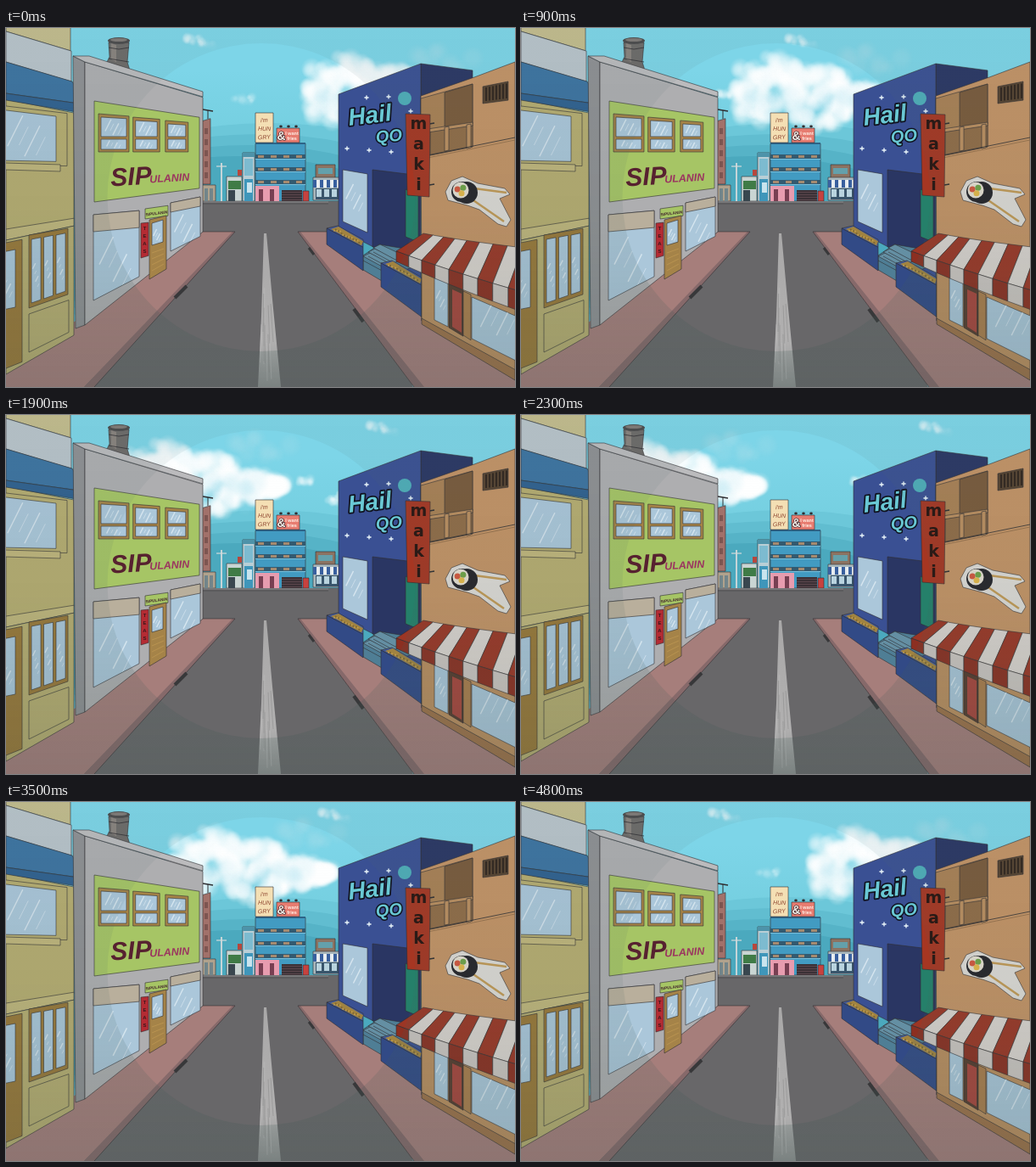
Animation of 600x423 px, one loop 4900 ms. Source, as an HTML page with a canvas:

```html
<!DOCTYPE html>
<html lang="en">
<head>
<meta charset="utf-8">
<title>Street with drifting clouds</title>
<style>
html,body{margin:0;width:100%;height:100%;overflow:hidden;background:#78c9dd}
canvas{display:block;width:100%;height:100%}
</style>
</head>
<body>
<canvas id="stage" width="600" height="423"></canvas>
<script>
const W = 600, H = 423, STEP = 100, FRAMES = 49, SPEED = 11.33, PAD = 40;
const INK = '#2f2e31';
const SANS = '"Liberation Sans", Arial, sans-serif', WIDE = '"DejaVu Sans", sans-serif';
const view = document.getElementById('stage').getContext('2d');
let c;

function layer(w, h, draw) {
  const el = document.createElement('canvas');
  el.width = w; el.height = h;
  c = el.getContext('2d');
  c.lineJoin = 'round';
  draw();
  return el;
}

function times(n, fn) { for (let i = 0; i < n; i++) fn(i); }

function random(seed) {
  return () => (seed = (seed * 16807) % 2147483647) / 2147483647;
}

function trace(p) {
  c.beginPath();
  for (let i = 0; i < p.length; i += 2) c.lineTo(p[i], p[i + 1]);
}

function poly(fill, ...p) {
  trace(p); c.closePath();
  c.fillStyle = fill; c.fill();
}

function shape(fill, ...p) {
  poly(fill, ...p);
  c.strokeStyle = INK; c.lineWidth = 0.6; c.stroke();
}

function line(color, width, ...p) {
  trace(p);
  c.strokeStyle = color; c.lineWidth = width; c.stroke();
}

function rect(fill, x, y, w, h) { c.fillStyle = fill; c.fillRect(x, y, w, h); }

function oval(fill, x, y, rx, ry = rx) {
  c.beginPath(); c.ellipse(x, y, rx, ry, 0, 0, 7);
  c.fillStyle = fill; c.fill();
}

// Upright-sided panel whose top and bottom edges have slopes s and t.
function slab(x, y, w, h, s = 0, t = s) {
  return [x, y, x + w, y + s * w, x + w, y + h + t * w, x, y + h];
}

function box(fill, ...dims) { shape(fill, ...slab(...dims)); }

function pane(x, y, w, h, s = 0, t = s) {
  const p = slab(x, y, w, h, s, t), k = Math.min(w, h) * 0.3;
  shape('#abc7da', ...p);
  c.save();
  trace(p); c.closePath(); c.clip();
  times(4, i => {
    const gx = x + w * (0.28 + i * 0.15), gy = y + h * (0.42 + i * 0.1), r = k * (i % 2 ? 0.6 : 1);
    line('rgba(232,242,248,.7)', i % 2 ? 0.7 : 1.4, gx - r / 2, gy + r, gx + r / 2, gy - r);
  });
  c.restore();
}

function text(str, x, y, font, fill, rot = 0, outline = 0) {
  c.save();
  c.translate(x, y); c.rotate(rot);
  c.font = font; c.textAlign = 'center';
  if (outline) { c.strokeStyle = '#10131f'; c.lineWidth = outline; c.strokeText(str, 0, 0); }
  c.fillStyle = fill; c.fillText(str, 0, 0);
  c.restore();
}

function sparkle(x, y) {
  times(2, i => oval('#dce8f2', x, y, i ? 3 : 0.9, i ? 0.9 : 3));
}

function puff(x, y, r, alpha, tint = '255,255,255') {
  const g = c.createRadialGradient(x, y, 0, x, y, r);
  g.addColorStop(0, `rgba(${tint},${alpha})`);
  g.addColorStop(0.5, `rgba(${tint},${alpha * 0.7})`);
  g.addColorStop(1, `rgba(${tint},0)`);
  c.fillStyle = g;
  c.fillRect(x - r, y - r, r * 2, r * 2);
}

function drawSky() {
  rect('#7dd5e8', 0, 0, W, H);
  const g = c.createLinearGradient(0, 50, 0, 125);
  g.addColorStop(0, 'rgba(117,207,224,0)');
  g.addColorStop(1, '#75cfe0');
  rect(g, 0, 50, W, H);
  times(4, i => oval(`rgb(${108 - i * 11},${199 - i * 10},${217 - i * 9})`, 310 - i * 12, 260, 280 - i * 15, 148 - i * 13));
}

function drawBigCloud() {
  c.translate(PAD, 0);
  const rnd = random(71);
  times(9, () => puff(140 + rnd() * 65, 22 + rnd() * 30, 9 + rnd() * 7, 0.16, '200,228,234'));
  times(330, () => {
    const u = rnd(), r = 8 + rnd() * 7;
    const top = 26 + 52 * u ** 2 + 14 * (1 - u) ** 8 + 4 * Math.sin(u * 19);
    const low = 109 + 13 * Math.sin(Math.PI * u) - 24 * u ** 6 + 4 * Math.sin(u * 15);
    puff(10 + 188 * u, top + r * 0.6 + rnd() * (low - top - r * 1.2), r, 0.42);
  });
  times(26, () => puff(25 + rnd() * 150, 68 + rnd() * 45, 8 + rnd() * 10, 0.17, '150,216,234'));
}

function drawSmallClouds() {
  c.translate(PAD, 0);
  const rnd = random(19);
  const wisp = (x, y, rx, ry, alpha) => times(14, () =>
    puff(x + (rnd() * 2 - 1) * rx, y + (rnd() * 2 - 1) * ry, 3 + rnd() * 4, alpha));
  wisp(222, 14, 10, 4, 0.22);
  wisp(238, 19, 9, 2, 0.05);
  wisp(280, 83, 13, 3, 0.13);
  wisp(138, 78, 9, 3, 0.24);
  wisp(172, 97, 8, 6, 0.3);
}

function drawRoad() {
  poly('#686769', 228, 204, 395, 204, 395, 240, 480, 423, 90, 423, 228, 240);
  times(2, i => line(i ? '#4d4d50' : '#8b8b8d', 0.9, 231, 205 + i * 2, 380, 205 + i * 2));
  const walk = '#a67e7b', curb = '#86696a';
  poly(walk, 228, 240, 270, 240, 92, 423, 0, 423, 0, 400, 82, 345);
  poly(walk, 344, 240, 380, 240, 600, 400, 600, 423, 481, 423);
  poly(curb, 267, 240, 270, 240, 104, 423, 92, 423);
  poly(curb, 344, 240, 347, 240, 493, 423, 481, 423);
  line(INK, 0.6, 231, 240, 270, 240, 104, 423);
  line(INK, 0.6, 378, 240, 344, 240, 481, 423);
  line('#38383a', 4, 199, 318, 213, 304);
  line('#38383a', 4, 410, 331, 421, 346);
  line('#38383a', 3, 357, 259, 363, 267);
  const g = c.createLinearGradient(0, 242, 0, 423);
  g.addColorStop(0, '#a9a8a8');
  g.addColorStop(0.7, '#b1b0b0');
  g.addColorStop(1, '#8d8f8f');
  poly(g, 304, 242, 307, 242, 314, 320, 324, 423, 297, 423, 301, 340);
  const rnd = random(5);
  times(12, () => {
    const u = rnd() * 0.8 + 0.1, y = 300 + rnd() * 75;
    const x = v => 304 + u * 3 + (u * 24 - 8) * (v - 242) / 181;
    line(rnd() < 0.5 ? 'rgba(125,125,126,.4)' : 'rgba(195,195,195,.4)', 1, x(y), y, x(y + 45), y + 45);
  });
}

function drawBackdrop() {
  // brick corner, lamp and pole
  box('#a2716a', 230, 110, 11, 74, -0.3, 0);
  times(5, i => rect('#7d5551', 234, 118 + i * 13, 4, 7));
  line(INK, 1, 238, 107, 238, 97);
  line(INK, 1.3, 232, 96, 244, 98);
  box('#b0a28d', 230, 185, 17, 19);
  times(2, i => rect('#72858a', 234 + i * 6, 189, 4, 15));
  line('#d3dadb', 1.8, 254, 159, 254, 204);
  line('#d3dadb', 1.2, 248, 163, 260, 163);
  // small shops
  box('#c9d5d3', 260, 175, 18, 29);
  rect('#3f7b46', 262, 180, 15, 10);
  rect('#39474f', 262, 191, 8, 13);
  rect('#b6473c', 273, 167, 5, 7);
  box('#b9cfd6', 279, 147, 14, 57);
  rect('#4e93a9', 279, 147, 14, 5);
  rect('#7dbbd0', 281, 154, 10, 20);
  rect('#3f96ba', 281, 178, 10, 26);
  rect('#c9e4ee', 284, 182, 6, 12);
  // blue block
  box('#429bc2', 294, 136, 59, 68);
  rect('#2d6487', 294, 135, 59, 2);
  times(3, i => {
    const y = 149 + i * 15;
    rect('#335a70', 294, y, 59, 5);
    times(4, k => rect('#a58a70', 297 + k * 15, y + 1, 7, 3));
    rect('#79c0dc', 294, y + 5, 59, 1);
  });
  rect('#e79caf', 294, 186, 28, 18);
  times(2, i => rect('#783f52', 298 + i * 13, 190, 5, 14));
  rect('#3b3136', 325, 191, 24, 13);
  times(4, i => rect('#675057', 325, 193 + i * 3, 24, 0.7));
  box('#c7423f', 350, 192, 7, 12);
  // striped shop
  box('#8c7362', 365, 161, 23, 16);
  rect('#64a0ab', 368, 165, 17, 7);
  box('#a9b8bd', 362, 176, 32, 27);
  times(8, i => rect(i % 2 ? '#e8edf0' : '#385f9e', 362 + i * 4, 179, 4, 9));
  rect('#39556b', 365, 189, 27, 13);
  times(3, i => rect('#b8d3de', 366 + i * 9, 190, 6, 9));
  // roof signs
  box('#f4dfb4', 294, 100, 21, 35);
  ["i'm", 'HUN', 'GRY'].forEach((s, i) =>
    text(s, 304.5, 111 + i * 10, 'italic 7px ' + SANS, '#8e4630', i % 2 ? 0.04 : -0.08));
  box('#e77c70', 319, 118, 27, 17);
  times(3, i => oval(INK, 324 + i * 9, 116, 1.8, 1.4));
  text('&', 324.5, 132, 'bold 14px ' + SANS, '#fff1e8', 0, 1.2);
  ['I want', 'fries'].forEach((s, i) => text(s, 337, 126 + i * 6, 'bold 5.5px ' + SANS, '#fff1e8'));
}

function drawYellowHouse() {
  const wall = '#b7ad70', trim = '#c0b67b', wood = '#9a7838';
  box('#c3bc8c', 0, -40, 76, 44, 0, 0.3);
  box('#b9c4ca', 0, 4, 77, 36, 0.3);
  box(wall, 0, 84, 80, 156, 0.2, -0.18);
  box(wall, -8, 91, 80, 70, 0.12, 0.02);
  pane(-8, 96, 67, 60, 0.12, 0.02);
  box(trim, -2, 159, 66, 8, 0.03);
  shape('#3c73a1', 0, 40, 78, 63, 93, 90, 0, 77);
  box('#2f608f', 0, 77, 93, 8, 0.14, 0.17);
  box(trim, 0, 237, 80, 13, -0.16, -0.21);
  box(wall, 0, 250, 80, 158, -0.21, -0.575);
  box(wood, -10, 255, 29, 150, -0.2, -0.4);
  pane(-9, 265, 20, 68, -0.2);
  box(wood, 27, 244, 46, 86, -0.17, -0.35);
  times(3, i => pane(30 + i * 14.5, 249 - i * 2.5, 11, 75 - i * 2.5, -0.2, -0.35));
  box(wall, 27, 337, 47, 45, -0.35, -0.5);
}

function drawTeaHouse() {
  const wall = '#aeaeb0', wood = '#a58348', tint = '#b9af9c';
  shape('#6d6a68', 121, 17, 145, 17, 143, 40, 146, 50, 119, 40, 122, 34);
  poly('#89827d', 124, 18, 130, 20, 130, 40, 124, 37);
  times(2, i => oval(i ? '#7f7a76' : '#4b4a4b', 133, 15 - i, 13 - i * 3, 4 - i * 2));
  times(2, i => line(INK, 0.8, 121, 23 + i * 13, 133, 25 + i * 13, 145, 23 + i * 17));
  shape('#8f9093', 79, 33, 93, 40, 93, 350, 82, 354);
  box(wall, 93, 40, 139, 310, 0.3, -0.79);
  shape('#bbbbbd', 79, 33, 98, 33, 232, 75, 232, 81, 93, 40);
  box('#a6c565', 104, 86, 124, 119, 0.155, -0.13);
  times(3, i => {
    const x = 109 + 42 * i - 1.3 * i * i, y = 101 + i * 4, w = 36 - i * 4.5;
    box(wood, x, y, w, 146 - y, 0.08, 0);
    pane(x + 3, y + 4, w - 6, 124 - y, 0.06, 0);
    pane(x + 3, 131, w - 6, 12);
  });
  text('SIP', 148, 185, 'italic bold 30px ' + SANS, '#572130', -0.06);
  text('ULANIN', 193, 181, 'italic bold 12.5px ' + SANS, '#9b3560', -0.06);
  pane(103, 220, 54, 101, -0.09, -0.52);
  box(tint, 103, 220, 54, 20, -0.09);
  pane(194, 206, 35, 57, -0.2, -0.5);
  box(tint, 194, 206, 35, 11, -0.2);
  box('#a6c565', 164, 213, 27, 12, -0.14);
  text('SIPULANIN', 177.5, 220, 'bold 4.8px ' + SANS, '#43242d', -0.12);
  box('#b42b33', 159, 230, 9, 41, -0.1, -0.3);
  [...'TEAS'].forEach((s, i) => text(s, 163.5, 238 + i * 9, 'bold 6px ' + SANS, '#3d171c'));
  box(wood, 169, 226, 20, 70, -0.25, -0.6);
  pane(172, 230, 13, 26, -0.3);
  times(4, i => line('#c09a55', 0.7, 172, 265 + i * 7, 186, 260 + i * 6));
}

function drawPlanter(x, y, w, h, slope) {
  shape('#41599a', x, y, x + 13, y - 3, x + w, y + slope * w - 9, x + w, y + slope * w);
  poly('#a18340', x + 5, y + 1, x + 14, y - 2, x + w, y + slope * w - 7, x + w - 2, y + slope * w - 2);
  const rnd = random(w);
  times(18, i => {
    const u = 9 + (w - 12) * i / 18;
    oval(i % 2 ? '#7b6634' : '#c09c4b', x + u, y + u * slope - 2 - rnd() * 3, 1);
  });
  box('#324a86', x, y, w, h, slope, slope + 0.2);
}

function drawBlueHouse() {
  const lit = '#3a5093', dark = '#2a3663';
  box(dark, 489, 42, 61, 60, 0.13, 0);
  shape(lit, 392, 78, 489, 42, 489, 310, 433, 258, 392, 237);
  shape(dark, 432, 167, 473, 172, 488, 190, 488, 264, 432, 258);
  box('#25806a', 471, 190, 15, 56, 0.5, 0.4);
  pane(397, 167, 29, 61, 0.17, 0.45);
  shape('#4f7e95', 421, 268, 440, 255, 482, 262, 482, 280, 443, 298, 421, 285);
  times(3, i => {
    const x = 421 + i * 6, y = 269 - i * 5;
    shape('#648fa3', x, y, x + 8, y - 4, x + 38, y + 10, x + 26, y + 14);
    line(INK, 0.6, x, y + 5, x + 26, y + 19);
  });
  drawPlanter(378, 236, 43, 19, 0.52);
  drawPlanter(442, 277, 48, 28, 0.54);
  text('Hail', 430, 112, 'italic bold 28px ' + SANS, '#69c8d4', -0.12, 3.5);
  text('QO', 452, 134, 'italic bold 20px ' + SANS, '#69c8d4', -0.1, 3);
  oval('#4eaeb9', 470, 83, 8);
  times(3, i => {
    sparkle(425 + i * 26, 82 - i * 10 + i * i * 9);
    sparkle(402 + i * 26, 142 + i * 2);
  });
}

function drawMakiPicture() {
  shape('#dedbd6', 518, 193, 525, 180, 538, 175, 556, 183, 588, 189, 594, 196, 582, 201,
    595, 226, 590, 234, 580, 231, 558, 214, 544, 209, 521, 203);
  line('#c29a56', 2.5, 552, 189, 590, 194);
  line('#c29a56', 2.5, 548, 201, 587, 228);
  oval('#25242a', 543, 194, 13);
  oval('#25242a', 537, 193, 12);
  oval('#e6dfd2', 536, 191, 9.5);
  ['#d3573d', '#6fa448', '#e4b94a'].forEach((col, i) =>
    oval(col, 536 + 4 * Math.cos(3.4 + i * 2.1), 191 + 4 * Math.sin(3.4 + i * 2.1), 3.5));
}

function drawAwning() {
  const top = k => [492 + 11 * k + 0.45 * k * k, 242 + 2.1 * k];
  const edge = k => [460 + 14.5 * k + 0.25 * k * k, 263 + 5.4 * k];
  const hem = k => [edge(k)[0], 275 + 6.7 * k];
  times(9, k => {
    const p = [top, edge, hem].map(f => [f(k), f(k + 1)]);
    shape(k % 2 ? '#dcd5d0' : '#9c3625', ...p[0][0], ...p[0][1], ...p[1][1], ...p[1][0]);
    shape(k % 2 ? '#cdc6c2' : '#8c2f21', ...p[1][0], ...p[1][1], ...p[2][1], ...p[2][0]);
  });
}

function drawMakiHouse() {
  const wall = '#c49365', beam = '#bb8e5f';
  shape(wall, 489, 80, 552, 58, 600, 40, 600, 414, 490, 345);
  box('#a98054', 489, 83, 61, 69, -0.28, -0.2);
  box('#7a5a3b', 517, 76, 33, 42, -0.3, -0.15);
  box('#916c47', 500, 122, 50, 28, -0.16, -0.2);
  box(beam, 497, 119, 53, 4, -0.15);
  times(2, i => box(beam, 517 + i * 26, 117 - i * 3, 5, 28, -0.2));
  times(2, i => line(i ? '#916b47' : INK, 0.8, 487, 152 + i * 3, 600, 129 + i * 3));
  box('#56422f', 562, 69, 30, 20, -0.2, -0.13);
  times(7, i => line('#241d18', 1.5, 566 + i * 4, 70 - i * 0.8, 566 + i * 4, 86 - i * 0.5));
  drawMakiPicture();
  // storefront
  box(beam, 490, 280, 110, 65, 0.42, 0.63);
  pane(505, 292, 16, 52, 0.4, 0.5);
  box('#563b2e', 522, 301, 17, 52, 0.45, 0.6);
  poly('#a8453c', 526, 308, 537, 313, 537, 359, 526, 352);
  box('#ab7d4c', 539, 310, 9, 52, 0.45, 0.65);
  pane(549, 317, 63, 49, 0.43, 0.5);
  box('#9e7149', 490, 342, 110, 7, 0.55, 0.6);
  drawAwning();
  // hanging board
  times(2, i => line(INK, 1.5, 499, 113 + i * 72, 505, 112 + i * 72));
  shape('#a63622', 471, 101, 500, 102, 499, 199, 473, 197);
  [...'maki'].forEach((s, i) => text(s, 486.5, 119 + i * 24, 'bold 19px ' + WIDE, '#27130f'));
}

function drawScene() {
  drawBackdrop();
  drawRoad();
  drawYellowHouse();
  drawTeaHouse();
  drawBlueHouse();
  drawMakiHouse();
}

function drawShade() {
  const g = c.createLinearGradient(0, 0, 0, H);
  g.addColorStop(0, 'rgba(90,115,120,.07)');
  g.addColorStop(0.5, 'rgba(75,100,98,.1)');
  g.addColorStop(1, 'rgba(60,85,80,.22)');
  c.beginPath();
  c.rect(0, 0, W, H);
  c.arc(301, 199.5, 181.5, 0, Math.PI * 2);
  c.fillStyle = g;
  c.fill('evenodd');
}

const sky = layer(W, H, drawSky);
const bigCloud = layer(300, 150, drawBigCloud);
const smallClouds = layer(360, 130, drawSmallClouds);
const scene = layer(W, H, drawScene);
const shade = layer(W, H, drawShade);

function tick() {
  const n = Math.floor(performance.now() / STEP) % FRAMES;
  const shift = Math.min(n, FRAMES - n) * SPEED;
  view.drawImage(sky, 0, 0);
  view.drawImage(smallClouds, shift - PAD, 0);
  view.drawImage(bigCloud, 345 - shift - PAD, 0);
  view.drawImage(scene, 0, 0);
  view.drawImage(shade, 0, 0);
  requestAnimationFrame(tick);
}
tick();
</script>
</body>
</html>
```
